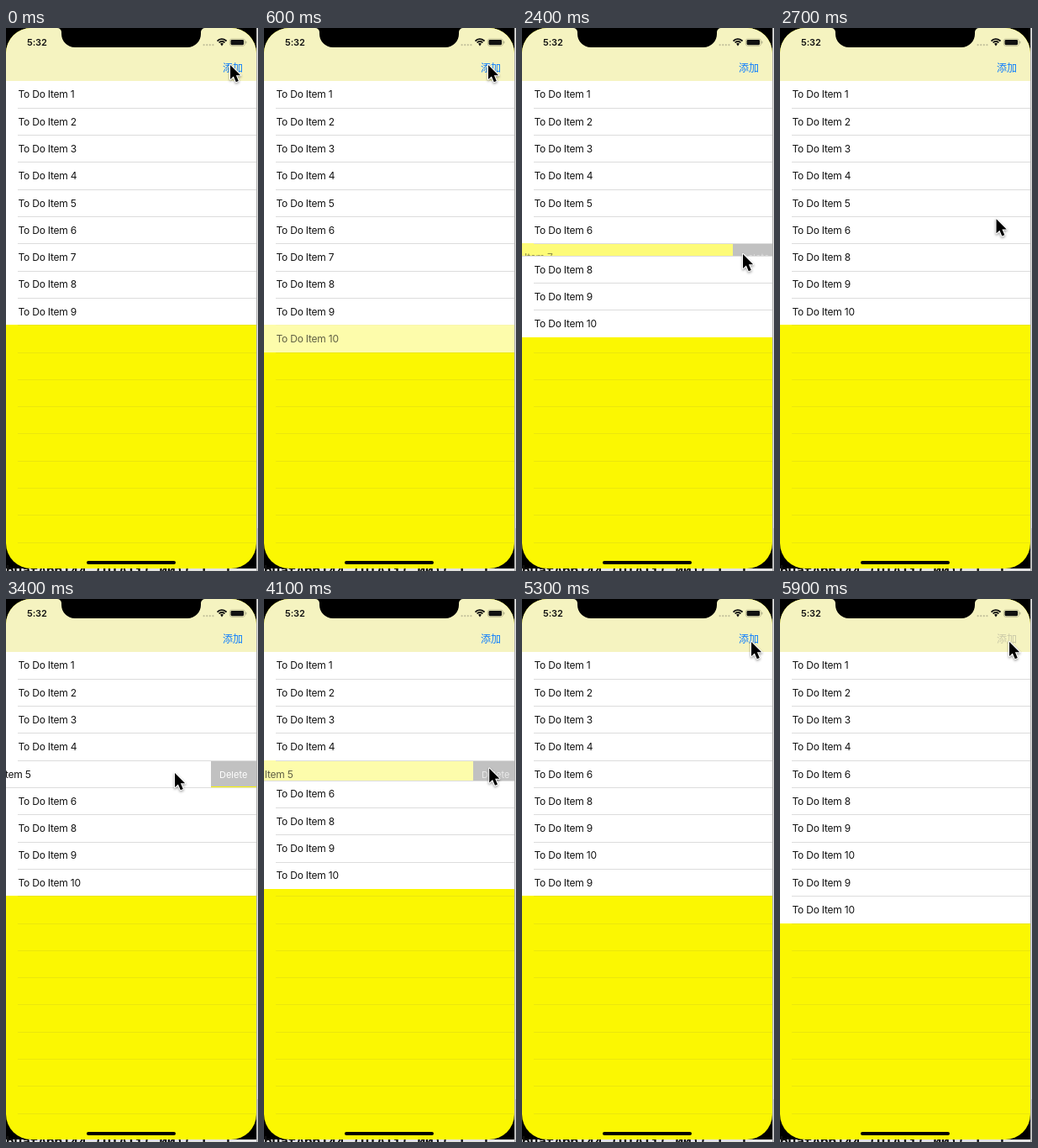
An HTML page with a canvas that plays this animation: 300x646 px, repeating every 6 s.

```html
<!DOCTYPE html>
<html lang="zh">
<head>
<meta charset="utf-8">
<style>
  html, body { margin: 0; height: 100%; overflow: hidden; background: #eee; }
  canvas { display: block; width: 300px; height: 646px; }
</style>
</head>
<body>
<canvas id="stage"></canvas>
<script>
const LOOP = 6000, STEP = 100, ANIM = 300;
const WIDTH = 298, TOP = 63, ROW = 32.3;
const YELLOW = '#fbf702', BAR = '#f5f3c0', LINE = '#dcdcdc', FAINT = '#ebe70c';
const UI = 'Inter, sans-serif', CJK = '"Noto Sans CJK SC", "Noto Sans CJK", sans-serif';

const canvas = document.getElementById('stage');
const ratio = window.devicePixelRatio || 1;
canvas.width = 300 * ratio;
canvas.height = 646 * ratio;
const ctx = canvas.getContext('2d');
ctx.scale(ratio, ratio);

// Each row: its number, when it is inserted, when it is deleted, how far it is swiped.
const rows = [1, 2, 3, 4, 5, 6, 7, 8, 9].map(n => ({ n, add: -ANIM, del: Infinity }));
rows.push({ n: 10, add: 400, del: Infinity }, { n: 9, add: 4850, del: Infinity }, { n: 10, add: 5600, del: Infinity });
Object.assign(rows[6], { del: 2240, swipe: [[1200, 0], [1600, 49], [2200, 49], [2500, 46]] });
Object.assign(rows[4], { del: 4000, swipe: [[2950, 0], [3400, 54], [3600, 49]] });

const dimmed = [[300, 600], [1500, 2250], [3500, 4000], [4800, 5100], [5500, LOOP]];
const pointer = [
  [0, 267, 44], [600, 267, 44], [1150, 208, 285], [1200, 208, 285], [1600, 160, 284],
  [1750, 160, 284], [2100, 263, 269], [2450, 263, 269], [2850, 255, 208], [2950, 255, 208],
  [3400, 201, 207], [3500, 201, 207], [3800, 268, 205], [4050, 268, 205],
  [4600, 277, 57], [4800, 273, 51], [LOOP, 273, 51]
];

const clamp = v => Math.max(0, Math.min(1, v));
const ease = v => (v = clamp(v), v * v * (3 - 2 * v));

function track(keys, t, axis = 1) {
  const i = keys.findIndex(k => k[0] > t);
  if (i < 0) return keys[keys.length - 1][axis];
  if (i === 0) return keys[0][axis];
  const a = keys[i - 1], b = keys[i];
  return a[axis] + (b[axis] - a[axis]) * ease((t - a[0]) / (b[0] - a[0]));
}

function rect(color, x, y, w, h, radius = 0) {
  ctx.fillStyle = color;
  ctx.beginPath();
  ctx.roundRect(x, y, w, h, radius);
  ctx.fill();
}

function text(str, x, y, color, font, spacing = 0) {
  ctx.font = font;
  ctx.letterSpacing = spacing + 'px';
  ctx.fillStyle = color;
  ctx.fillText(str, x, y);
}

function drawRow(row, y, shift, t) {
  const top = Math.floor(y), height = Math.floor(y + ROW) - top;
  const leaving = clamp((t - row.del) / ANIM);
  const edge = Math.round(WIDTH - shift);
  const alpha = Math.min(clamp((t - row.add) / ANIM), 1 - leaving);
  ctx.globalAlpha = alpha;
  rect('#fff', 0, top, edge, height);
  text('To Do Item ' + row.n, 14.5 - shift, y + 20.3, '#111', '12px ' + UI, -0.22);
  if (shift) {
    ctx.globalAlpha = 1;
    rect('#c1c1c1', edge, top, WIDTH - edge, height - 1);
    ctx.globalAlpha = alpha;
    text('Delete', edge + 10, y + 20.3, '#fff', '11px ' + UI);
  }
  ctx.globalAlpha = 1;
}

function drawList(t) {
  for (let i = 8; i < 18; i++) rect(FAINT, 14, Math.floor(TOP + i * ROW), WIDTH - 14, 1);
  let y = TOP, inset = 14;
  for (const row of rows) {
    if (t < row.add || t >= row.del + ANIM) continue;
    const shift = row.swipe ? track(row.swipe, t) : 0;
    drawRow(row, y, shift, t);
    if (y > TOP && t >= row.add + ANIM) rect(LINE, inset, Math.floor(y), WIDTH - inset, 1);
    inset = shift ? 0 : 14;
    y += ROW * (1 - ease((t - row.del) / ANIM));
  }
}

function drawStatus() {
  text('5:32', 25, 21, '#111', '600 11px ' + UI, -0.1);
  for (let i = 0; i < 4; i++) rect('#c4c29c', 234.5 + i * 3.6, 19, 2.2, 2.2, 1);
  ctx.strokeStyle = '#111';
  ctx.lineWidth = 1.8;
  for (const r of [4.5, 7.3]) {
    ctx.beginPath();
    ctx.arc(257, 20.5, r, -Math.PI * 0.77, -Math.PI * 0.23);
    ctx.stroke();
  }
  ctx.fillStyle = '#111';
  ctx.beginPath();
  ctx.moveTo(257, 21.5);
  ctx.arc(257, 20.5, 2.5, -Math.PI * 0.77, -Math.PI * 0.23);
  ctx.fill();
  ctx.strokeStyle = '#b5b38c';
  ctx.lineWidth = 0.8;
  ctx.beginPath();
  ctx.roundRect(266.4, 12.9, 18, 8.4, 2.4);
  ctx.stroke();
  rect('#111', 267.5, 14, 15.6, 6.2, 1.4);
  rect('#b5b38c', 285.2, 15.6, 1.2, 3, 0.6);
}

const notch = new Path2D('M61 0A5 5 0 0 1 66 5V7A16 16 0 0 0 82 23H216A16 16 0 0 0 232 7V5A5 5 0 0 1 237 0Z');
const arrow = new Path2D('M0 0V17L3.9 13.5L6.8 20.2L9.8 18.9L6.9 12.3H12.2Z');

function drawPointer(x, y) {
  ctx.save();
  ctx.translate(x, y);
  ctx.lineJoin = 'round';
  ctx.lineWidth = 2;
  ctx.strokeStyle = '#fff';
  ctx.shadowColor = 'rgba(0,0,0,.4)';
  ctx.shadowBlur = 3 * ratio;
  ctx.shadowOffsetY = 1.5 * ratio;
  ctx.stroke(arrow);
  ctx.shadowColor = 'transparent';
  ctx.fillStyle = '#000';
  ctx.fill(arrow);
  ctx.restore();
}

function drawBackdrop() {
  rect('#e2e2e2', 0, 0, 300, 646);
  rect('#adadad', 298, 0, 1, 646);
  rect('#c8c8c8', 299, 595, 1, 51);
  rect('#000', 0, 0, WIDTH, 643);
  text('buatAppl44.(UIAli(.00)(.1 .1', 0, 651, '#111', 'bold 16px "Noto Sans Mono", monospace');
}

function draw(t) {
  drawBackdrop();
  ctx.save();
  ctx.beginPath();
  ctx.roundRect(0, 0, WIDTH, 643, 30);
  ctx.clip();
  rect(YELLOW, 0, 0, WIDTH, 646);
  drawList(t);
  rect(BAR, 0, 0, WIDTH, TOP);
  const dim = dimmed.some(([from, to]) => t >= from && t < to);
  text('添加', 258, 51.5, dim ? '#cac9a8' : '#0a7cff', '500 12px ' + CJK);
  drawStatus();
  rect('#000', 96, 634, 106, 4, 2);
  ctx.restore();
  ctx.fillStyle = '#000';
  ctx.fill(notch);
  drawPointer(track(pointer, t), track(pointer, t, 2));
}

function tick(now) {
  draw(Math.floor(now % LOOP / STEP) * STEP);
  requestAnimationFrame(tick);
}
requestAnimationFrame(tick);
</script>
</body>
</html>
```
